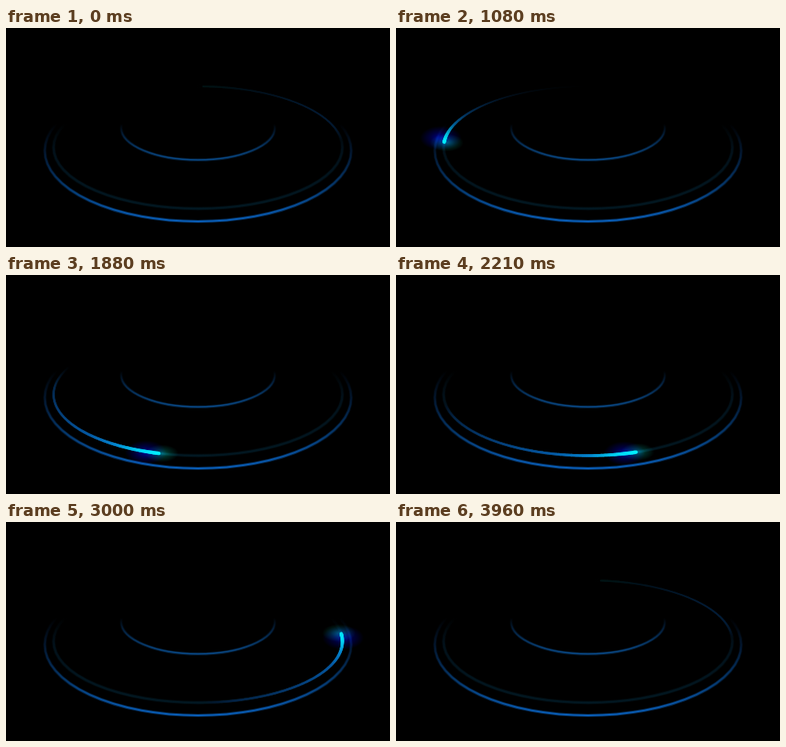
Animation, 480 px wide and 274 px high, one loop 4 s. Source, as an HTML page with a canvas:

```html
<!DOCTYPE html>
<html lang="en">
<head>
<meta charset="utf-8">
<title>Orbiting light</title>
<style>
html, body { margin: 0; width: 100%; height: 100%; overflow: hidden; background: #000; }
canvas { display: block; width: 480px; height: 274px; }
</style>
</head>
<body>
<canvas id="stage" width="480" height="274"></canvas>
<script>
const ctx = document.getElementById('stage').getContext('2d');
const LOOP = 4000, CX = 240, LAG = 0.045;
const ORBIT = { cy: 149.5, rx: 180.5, ry: 76.5 };
const TILT = 0.17;                       // perspective of the tilted circle
const TAIL = 94 * Math.PI / 180, STEPS = 150;
const TAIL_COLORS = [
  [0, 0, 238, 255], [0.07, 0, 208, 242], [0.17, 3, 130, 204], [0.3, 4, 86, 160],
  [0.55, 4, 58, 114], [0.8, 3, 34, 68], [1, 0, 0, 0]
];

const clamp = v => Math.max(0, Math.min(1, v));

// Angle runs anticlockwise from the far side of the circle.
function project(angle) {
  const w = 1 + TILT * Math.cos(angle);
  return {
    x: CX - ORBIT.rx * Math.sqrt(1 - TILT * TILT) * Math.sin(angle) / w,
    y: ORBIT.cy - ORBIT.ry * (Math.cos(angle) + TILT) / w
  };
}

const nearness = y => 0.07 + 0.93 * clamp((y - 73) / 70);

function tailColor(u, light) {
  let i = 1;
  while (i < TAIL_COLORS.length - 1 && u > TAIL_COLORS[i][0]) i++;
  const a = TAIL_COLORS[i - 1], b = TAIL_COLORS[i];
  const k = (u - a[0]) / (b[0] - a[0]);
  const rgb = [1, 2, 3].map(c => Math.round((a[c] + (b[c] - a[c]) * k) * light));
  return `rgb(${rgb})`;
}

// A faint wide stroke under a narrow one gives the line a soft edge.
function ring(cy, rx, ry, width, stops) {
  const fade = ctx.createLinearGradient(0, 120, 0, cy + ry);
  stops.forEach(([at, color]) => fade.addColorStop(at, color));
  ctx.strokeStyle = fade;
  ctx.beginPath();
  ctx.ellipse(CX, cy, rx, ry, 0, 0, 2 * Math.PI);
  for (const [extra, alpha] of [[1.5, 0.4], [-0.3, 0.85]]) {
    ctx.lineWidth = width + extra;
    ctx.globalAlpha = alpha;
    ctx.stroke();
  }
  ctx.globalAlpha = 1;
}

function glow(x, y, rx, ry, rgb, alpha) {
  ctx.save();
  ctx.translate(x, y);
  ctx.scale(rx, ry);
  const g = ctx.createRadialGradient(0, 0, 0, 0, 0, 1);
  g.addColorStop(0, `rgba(${rgb},${alpha})`);
  g.addColorStop(0.5, `rgba(${rgb},${alpha * 0.42})`);
  g.addColorStop(1, `rgba(${rgb},0)`);
  ctx.fillStyle = g;
  ctx.fillRect(-1, -1, 2, 2);
  ctx.restore();
}

function comet(head) {
  const p = project(head), light = nearness(p.y);
  const ahead = { x: -Math.cos(head), y: -0.42 * -Math.sin(head) };
  const out = -Math.sin(head);

  ctx.globalCompositeOperation = 'lighter';
  const shine = light * light;
  glow(p.x - 16 * ahead.x + 3 * out, p.y - 12 * ahead.y, 26, 15, '0,0,190', 0.75 * shine);
  glow(p.x + 3 * ahead.x - 3 * out, p.y + 2 * ahead.y, 21, 11, '0,120,100', 0.75 * shine);

  ctx.globalCompositeOperation = 'lighten';
  ctx.lineCap = 'round';
  for (let i = STEPS; i > 0; i--) {
    const u = (i - 0.5) / STEPS;
    const a = project(head - TAIL * i / STEPS);
    const b = project(head - TAIL * (i - 1) / STEPS);
    const near = nearness(b.y);
    ctx.strokeStyle = tailColor(u, near);
    ctx.lineWidth = (2.4 + 2 * (1 - u) ** 3) * (0.5 + 0.5 * near);
    ctx.beginPath();
    ctx.moveTo(a.x, a.y);
    ctx.lineTo(b.x, b.y);
    ctx.stroke();
  }
  ctx.globalCompositeOperation = 'source-over';
}

function draw(now) {
  ctx.fillStyle = '#000';
  ctx.fillRect(0, 0, 480, 274);
  ring(153.5, 191.5, 88.5, 2.5, [[0, '#000'], [0.3, '#031a36'], [0.65, '#053d77'], [1, '#0a68cc']]);
  ring(125, 96, 40, 2, [[0, '#000'], [0.3, '#04213f'], [1, '#0a5298']]);
  ring(ORBIT.cy, 180.5, ORBIT.ry, 2.8, [[0, '#000'], [0.3, '#02121c'], [1, '#021a25']]);
  comet((now % LOOP) / LOOP * 2 * Math.PI - LAG);
}

function tick() {
  draw(performance.now());
  requestAnimationFrame(tick);
}
tick();
</script>
</body>
</html>
```
